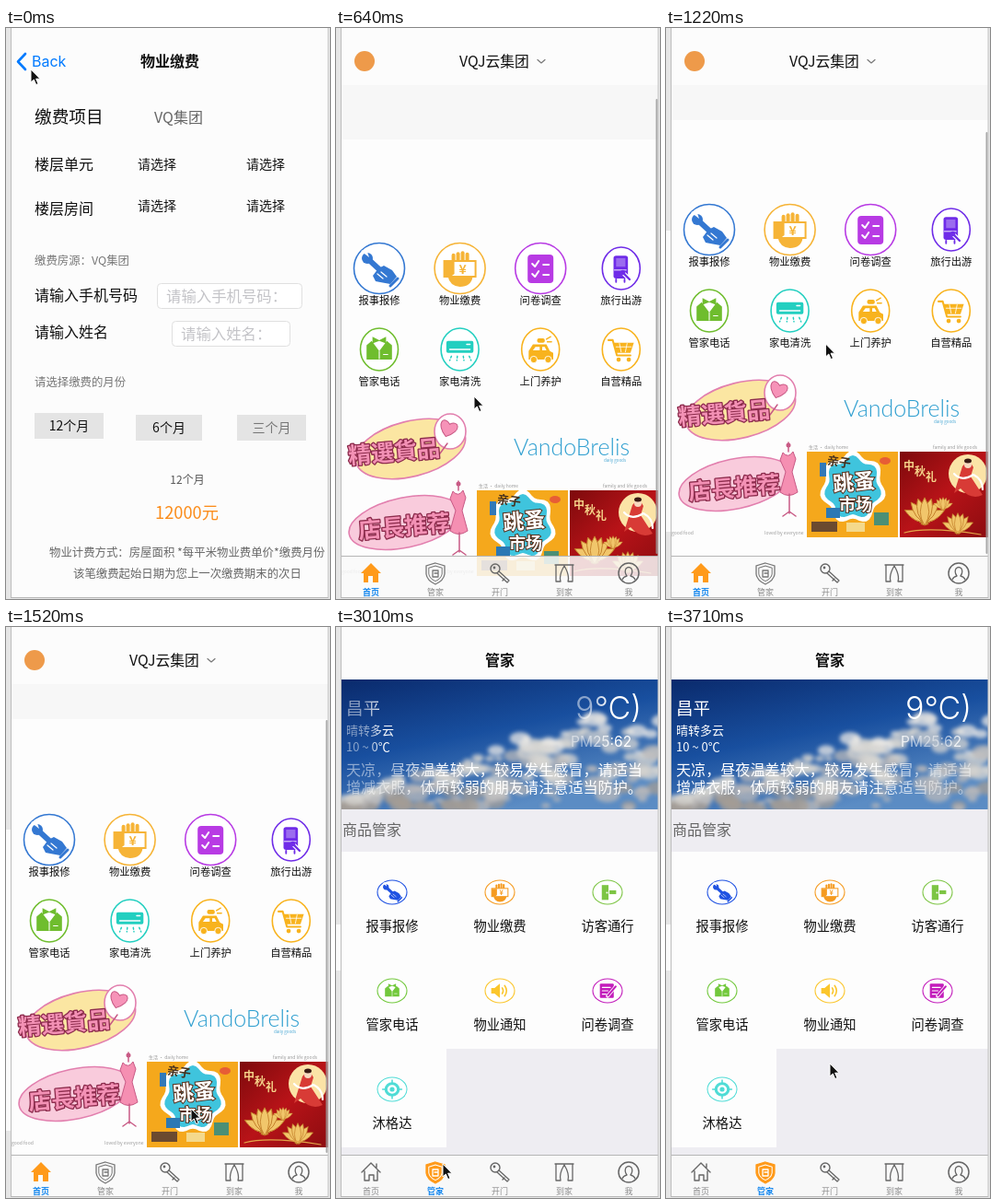
An HTML page that plays this animation: 352x620 px, repeating every 3.86 s.

```html
<!DOCTYPE html>
<html lang="zh">
<head>
<meta charset="utf-8">
<style>
html, body { margin: 0; width: 100%; height: 100%; overflow: hidden; background: #e6e6e6; }
svg { display: block; }
text { font-family: "Noto Sans CJK SC", "Noto Sans CJK", "Noto Sans CJK JP", sans-serif; white-space: pre; }
.latin { font-family: Inter, "Liberation Sans", sans-serif; }
</style>
</head>
<body>
<svg id="stage" width="352" height="620" viewBox="0 0 352 620"></svg>
<script>
const LOOP = 3860;

// ---- markup helpers ----
const attrs = o => Object.entries(o).map(([k, v]) => ` ${k}="${v}"`).join('');
const rect = (x, y, w, h, fill, o = {}) =>
  `<rect x="${x}" y="${y}" width="${w}" height="${h}" fill="${fill}"${attrs(o)}/>`;
const oval = (x, y, rx, ry, fill, o = {}) =>
  `<ellipse cx="${x}" cy="${y}" rx="${rx}" ry="${ry}" fill="${fill}"${attrs(o)}/>`;
const dot = (x, y, r, fill, o) => oval(x, y, r, r, fill, o);
const shape = (d, fill, o = {}) => `<path d="${d}" fill="${fill}"${attrs(o)}/>`;
const line = (d, color, width = 1.5, o = {}) => shape(d, 'none',
  { stroke: color, 'stroke-width': width, 'stroke-linecap': 'round', 'stroke-linejoin': 'round', ...o });
const text = (s, x, cy, size, fill = '#111', o = {}) =>
  `<text x="${x}" y="${cy + size * 0.37}" font-size="${size}" fill="${fill}"${attrs(o)}>${s}</text>`;
const mid = (s, x, cy, size, fill, o = {}) => text(s, x, cy, size, fill, { 'text-anchor': 'middle', ...o });
const at = (x, y, body, scale = 1, turn = 0) =>
  `<g transform="translate(${x} ${y}) rotate(${turn}) scale(${scale})">${body}</g>`;
const group = (id, body) => `<g id="${id}">${body}</g>`;
const bold = { 'font-weight': 700 };

function random(seed) {
  return () => (seed = (seed * 16807) % 2147483647) / 2147483647;
}

function blob(x, y, r, fill) {
  const points = Array.from({ length: 60 }, (_, i) => {
    const a = i * Math.PI / 30, d = r * (1 + .09 * Math.sin(a * 7));
    return `${(x + d * .9 * Math.cos(a)).toFixed(1)} ${(y + d * Math.sin(a)).toFixed(1)}`;
  });
  return shape(`M${points.join('L')}Z`, fill);
}

// ---- service icons, drawn around 0,0 ----
const icon = {};
icon.repair = c => line('M-12 -10L1 2', c, 6) + dot(-13, -11, 6, c) + shape('M-20 -19L-11 -12L-14 -21Z', '#fff') +
  shape('M-7 8L-1 0L5 -3L14 2L19 9L12 17L1 15L-4 14Z', c) + line('M-2 6L4 11M2 4L8 9', '#fff', 1.2) + line('M12 19L20 11', c, 3);
icon.pay = c => shape('M-13 9H14Q12 20 0 20Q-11 19 -13 9Z', c) +
  [-9, -4, 1, 6].map(x => rect(x, -19 + Math.abs(x) * .3, 4, 15, c, { rx: 2 })).join('') +
  rect(-17, -8, 34, 17, '#fff', { stroke: c, 'stroke-width': 2 }) +
  shape('M-17 -7H-6V6L-10 9H-17Z', c) + mid('¥', 3, .5, 14, c, bold);
icon.survey = c => rect(-14, -15, 28, 31, c, { rx: 4 }) +
  [-5, 6].map(y => line(`M-9 ${y}l3 3l4 -6M3 ${y + 1}h6`, '#fff', 2)).join('');
icon.travel = c => rect(-9, -15, 17, 27, c, { rx: 3 }) + rect(-6, -12, 11, 10, '#fff', { opacity: .3 }) +
  line('M-8 2H6', '#fff', 1) + line('M-6 13v3M4 13v3', c, 2) +
  line('M2 5l8 8', '#fff', 5) + line('M2 5l8 8', c, 2.5) + dot(2, 5, 3, c);
icon.butler = c => shape('M-15 -5L-9 -10L0 2L9 -10L15 -5V12H-15Z', c) +
  shape('M-8 -15L0 -11L8 -15V-7L0 -10L-8 -7Z', c) + line('M0 2V11M5 6H10', '#fff', 1.2);
icon.air = c => rect(-16, -10, 32, 14, c, { rx: 2 }) + line('M-12 0H12M8 -6H12', '#fff') +
  [-10, -3, 4, 11].map(x => line(`M${x} 8l${x / 5} 5`, c, 1.6, { 'stroke-dasharray': '2 2.5' })).join('');
icon.wash = c => shape('M-14 12V2L-9 -6H7L11 2L15 4V12Z', c) + shape('M-9 1l3 -4h5v4ZM2 1v-4h3l2 4Z', '#fff') +
  [-8, 9].map(x => dot(x, 12, 4, c, { stroke: '#fff' })).join('') +
  rect(-4, -13, 9, 5, c, { rx: 2 }) + line('M7 -12L12 -15M8 -9H13', c);
icon.cart = c => line('M-15 -11H-10L-5 7H11', c, 2.2) + shape('M-9 -8H15L11 4H-6Z', c) +
  line('M-6 -3H12M-2 -7L0 3M7 -7L5 3', '#fff', .9) + dot(-3, 12, 2.6, c) + dot(9, 12, 2.6, c);
icon.door = c => rect(-12, -15, 14, 31, c) + rect(4, -4, 14, 8, c) + dot(-1, 1, 2, '#fff');
icon.speaker = c => shape('M-18 -6H-11L0 -15V15L-11 6H-18Z', c) + line('M5 -6Q9 0 5 6M10 -11Q18 0 10 11', c, 3);
icon.note = c => rect(-16, -15, 29, 30, c, { rx: 2 }) + line('M-11 -7H6M-11 0H1M-11 7H-3', '#fff', 2) +
  line('M0 11L17 -9', '#fff', 7) + line('M1 10L17 -9', c, 4);
icon.target = c => oval(0, 0, 13, 12, 'none', { stroke: c, 'stroke-width': 6 }) + dot(0, 0, 5, c) +
  line('M0 -19v7M0 19v-7M-20 0h7M20 0h-7', c, 3);

// ---- bottom tabs ----
const homeTab = on => on
  ? shape('M0 -11L11 0H8V10H2V3H-3V10H-8V0H-11Z', '#ff9a1a')
  : line('M-10 0L0 -10L10 0M-7 -1V9H-2V3H3V9H7V-1M6 -9V-5', '#666', 1.4);
const butlerTab = on => {
  const edge = on ? '#ff9a1a' : '#777', ink = on ? '#fff' : '#777', shield = 'M0 -11L10 -8V1Q9 8 0 12Q-9 8 -10 1V-8Z';
  return shape(shield, on ? edge : '#fafafa', { stroke: edge, 'stroke-width': 1.3 }) +
    at(0, 0, line(shield, ink, 1.4), .72) + line('M-3 -3H3V4H-3ZM-1 0H3', ink, 1.3);
};
const doorTab = () => dot(-5, -5, 5, 'none', { stroke: '#666', 'stroke-width': 1.4 }) + dot(-6, -6, 1.4, '#666') +
  line('M-1 -2L10 8L8 10L-3 0M5 6L3 8', '#666', 1.3);
const visitTab = () => line('M-10 -9H10M-9 -9V9H-4Q-6 2 0 -8Q6 2 4 9H9V-9', '#666', 1.3);
const meTab = () => dot(0, 0, 11, 'none', { stroke: '#666', 'stroke-width': 1.5 }) +
  line('M-7 7Q-6 4 -2 3Q-5 -1 -3 -5Q0 -8 3 -5Q5 -1 2 3Q6 4 7 7', '#666', 1.3);
const tabs = [['首页', homeTab], ['管家', butlerTab], ['开门', doorTab], ['到家', visitTab], ['我', meTab]];
const tabBar = active => rect(5, 573, 345, 46, '#fafafa', { 'fill-opacity': .86 }) + rect(5, 573, 345, 1, '#b5b5b5') +
  tabs.map(([name, mark], i) => {
    const x = 38 + i * 70, on = i === active;
    return at(x, 592, mark(on)) + mid(name, x, 613, 9, on ? '#1487ee' : '#8a8a8a', on ? bold : {});
  }).join('');

// ---- home page ----
const services = [
  ['repair', '报事报修', '#3478d2'], ['pay', '物业缴费', '#f6b437'], ['survey', '问卷调查', '#b83be4'], ['travel', '旅行出游', '#6f2ce8'],
  ['butler', '管家电话', '#6fbd2e'], ['air', '家电清洗', '#23cfc0'], ['wash', '上门养护', '#f8b31e'], ['cart', '自营精品', '#f8b31e']
];
const serviceGrid = services.map(([kind, name, color], i) => {
  const x = 47 + (i % 4) * 87.6, y = i < 4 ? 231 : 319, big = i < 3;
  return oval(x, y, big ? 27.5 : 20.5, big ? 27.5 : 23, '#fff', { stroke: color, 'stroke-width': 1.6 }) +
    at(x, y, icon[kind](color), big ? 1 : .92) + mid(name, x, y + 34.5, 11.3);
}).join('');

const sticker = (s, x, y) => at(x, y, mid(s, 0, 0, 25, '#f391b5', {
  'font-weight': 900, stroke: '#8c2b4c', 'stroke-width': 2.6, 'paint-order': 'stroke', 'stroke-linejoin': 'round'
}), 1, -5);
const pink = '#c85a85';
const outline = { stroke: '#e27fae', 'stroke-width': 1.6 };
const goodsSticker = at(81, 427, oval(0, 0, 61, 30, '#fbe6a2', outline), 1, -14) + oval(124, 408, 17, 19, '#fff', outline) +
  at(122, 405, shape('M0 9C-16 -2 -8 -13 0 -5C8 -13 16 -2 0 9Z', '#f693b8', { stroke: pink }), 1, 18) +
  line('M113 432L121 421', pink) + sticker('精選貨品', 63, 430);
const shopSticker = at(75, 507, oval(0, 0, 62, 27, '#f9cbdc', outline), 1, -12) +
  at(133, 495, shape('M-6 -22Q0 -15 5 -23L8 -15L4 -1L10 21Q0 28 -9 21L-3 -1L-9 -14Z', '#f58fb2', { stroke: pink }) +
    line('M0 -33v10M1 23v21M-6 47l7 -5l7 5', pink) + dot(0, -30, 2.5, pink)) +
  sticker('店長推荐', 74, 511);

const ink = { 'font-weight': 900, stroke: '#57301c', 'stroke-width': 2, 'paint-order': 'stroke' };
const fleaPoster = rect(153, 472, 99, 93, '#f5a81c') + blob(203, 511, 37, '#fff') + blob(203, 511, 32, '#3fc4dd') +
  at(188, 483, mid('亲子', 0, 0, 13, '#46301d', { 'font-weight': 900 }), 1, 8) +
  at(204, 505, mid('跳蚤', 0, 0, 23, '#fff', ink), 1, -6) + mid('市场', 206, 529, 18, '#fff', ink) +
  rect(167, 484, 7, 15, '#3279b8') + rect(174, 533, 15, 11, '#2b78b4') + rect(158, 548, 28, 11, '#6b4a2f') +
  oval(238, 482, 6, 4, '#e75d35') + rect(226, 538, 16, 14, '#4b8f75') + rect(196, 549, 20, 10, '#f4d98c');

const lotus = (x, y, s) => at(x, y, [-64, 64, -38, 38, -18, 18, 0].map(a =>
  at(0, 0, shape('M0 6Q-9 -8 0 -23Q9 -8 0 6Z', '#f1c66b', { stroke: '#c07c27', 'stroke-width': .8 }), 1, a)).join(''), s);
const moonPoster = rect(254, 472, 96, 93, 'url(#red)') + dot(328, 496, 21, '#fbe3a6') +
  shape('M322 488Q329 479 334 489L331 499L344 519Q331 525 320 512L313 517Z', '#d83b36') +
  dot(328, 486, 4, '#f7d9c0') + oval(328, 482, 4, 2.5, '#3a1a14') + line('M313 496Q321 505 334 497Q344 502 344 513', '#fff', 2.2) +
  ['中', '秋', '礼'].map((c, i) => mid(c, 264 + i * 12, 488 + i * 6, 12, '#f6d48a', bold)).join('') +
  lotus(281, 546, 1.05) + lotus(317, 557, .8) + lotus(301, 533, .5) + line('M259 560Q285 553 342 562', '#e3a548', 1.2);

const tiny = (s, x, y) => text(s, x, y, 5, '#999');
const homeContent = serviceGrid + goodsSticker + shopSticker +
  text('VandoBrelis', 193, 425, 25, '#2f9fd0', { style: 'font-family:Lato,sans-serif;font-weight:300' }) +
  text('daily goods', 291, 439, 4.5, '#4aa8d4') +
  tiny('生活 · daily home', 155, 467) + tiny('family and life goods', 290, 467) +
  tiny('good food', 6, 560) + tiny('loved by everyone', 107, 560) + fleaPoster + moonPoster;

const homeNav = dot(31, 36, 11, '#ee9a4a') + text('VQJ云集团', 134, 36, 15.8) + line('M219 34.5l4 3.5l4 -3.5', '#777', 1.2);

// ---- payment page ----
const grey = '#777';
const field = (x, y, w, s) => rect(x + .5, y + .5, w, 27, '#fff', { rx: 4, stroke: '#e0e0e0' }) + text(s, x + 10, y + 14, 16.4, '#c4c4c8');
const monthButton = (x, y, w, s, color) => rect(x, y, w, 28, '#e4e4e4') + mid(s, x + w / 2, y + 14, 14, color);
const chooser = (label, y, pickY) => text(label, 31, y, 16) + [143, 261].map(x => text('请选择', x, pickY, 14)).join('');
const payTop = text('缴费项目', 31, 96, 18.7) + text('VQ集团', 161, 97, 16, '#666') +
  chooser('楼层单元', 148, 148) + chooser('楼层房间', 196, 193) + text('缴费房源：VQ集团', 31, 252, 12.4, grey) +
  text('请输入手机号码', 31, 290, 16) + field(164, 277, 157, '请输入手机号码：') +
  text('请输入姓名', 31, 330, 16) + field(180, 318, 128, '请输入姓名：');
const payBottom = text('请选择缴费的月份', 31, 384, 12.4, grey) +
  monthButton(31, 418, 75, '12个月', '#111') + monthButton(141, 420, 72, '6个月', '#111') + monthButton(251, 420, 75, '三个月', grey) +
  mid('12个月', 197, 491, 12, '#555') + mid('12000元', 196.5, 526, 18.3, '#fb8c1a') +
  text('物业计费方式：房屋面积 *每平米物业费单价*缴费月份', 47, 569, 12.4, '#666') +
  text('该笔缴费起始日期为您上一次缴费期末的次日', 73, 592, 12.4, '#666');
const payContent = rect(5, 62, 345, 557, '#fcfcfc') + payTop + payBottom;

// ---- butler page ----
function clouds() {
  const next = random(29);
  const tints = ['#eceae6', '#d7d5d2', '#b9b8ba', '#a39c95'];
  let out = '';
  for (let i = 0; i < 170; i++) {
    const x = next() * 349;
    const top = 186 - 86 * Math.min(1, x / 255) + 6 * Math.sin(x / 16);
    const depth = next(), r = 4 + next() * 10;
    const tint = tints[Math.min(3, Math.floor(depth * 2.4 + next() * 1.5 + (x < 150 ? .7 : 0)))];
    out += oval(Math.round(x + 5), Math.round(top + depth * (197 - top)), r.toFixed(1), (r * .62).toFixed(1), tint, { opacity: .75 });
  }
  return out;
}
const hero = `<g clip-path="url(#heroBox)">${rect(5, 57, 345, 141, 'url(#sky)')}<g filter="url(#soft)">${clouds()}</g></g>` +
  text('昌平', 11, 88, 18.5, 'url(#city)') + text('晴转多云', 11, 112, 13, 'url(#city)') + text('10 ~ 0℃', 11, 130, 13, 'url(#city)') +
  text('9°C)', 260, 87, 34, 'url(#temp)', { class: 'latin', 'font-weight': 300 }) +
  text('PM25:62', 255, 124, 15.5, 'url(#air)', { class: 'latin' }) +
  text('天凉，昼夜温差较大，较易发生感冒，请适当', 11, 155, 16.1, 'url(#tip)') +
  text('增减衣服，体质较弱的朋友请注意适当防护。', 11, 174, 16.1, 'url(#tip)');

const duties = [
  ['repair', '报事报修', '#1f52e2'], ['pay', '物业缴费', '#f59b20'], ['door', '访客通行', '#7dc544'],
  ['butler', '管家电话', '#72c83c'], ['speaker', '物业通知', '#fbc62c'], ['note', '问卷调查', '#c31cbb'],
  ['target', '沐格达', '#4fdcd6']
];
const dutyGrid = rect(5, 244, 345, 214, '#fdfdfd') + rect(5, 458, 115, 107, '#fdfdfd') +
  duties.map(([kind, name, color], i) => {
    const x = 61 + (i % 3) * 117, y = 288 + Math.floor(i / 3) * 107;
    return oval(x, y, 16, 13, '#fff', { stroke: color, 'stroke-width': 1.1 }) +
      at(x, y, icon[kind](color), .52) + mid(name, x, y + 36.5, 14.3);
  }).join('');
const butlerPage = rect(5, 0, 345, 619, '#fcfcfc') + mid('管家', 178, 36, 16, '#111', bold) +
  rect(5, 57, 345, 562, '#eeedf2') + hero + text('商品管家', 7, 220, 16, '#666') + dutyGrid + tabBar(1);

// ---- stage ----
const stops = (...list) => list.map(([o, c, a = 1]) => `<stop offset="${o}" stop-color="${c}" stop-opacity="${a}"/>`).join('');
const shimmer = id => `<linearGradient id="${id}" gradientUnits="userSpaceOnUse" y1="0" y2="0">` +
  stops([0, '#fff'], [.35, '#fff', .5], [.65, '#fff', .5], [1, '#fff']) + '</linearGradient>';
const clip = (id, y, h) => `<clipPath id="${id}">${rect(5, y, 345, h, '#000')}</clipPath>`;
const defs = `<defs>
  <linearGradient id="red" x2="1" y2="1">${stops([0, '#7d0a0c'], [.5, '#b81318'], [1, '#8c0c10'])}</linearGradient>
  <linearGradient id="sky" x2=".5" y2="1">${stops([0, '#0a2a6c'], [.5, '#184f9f'], [1, '#5b8cc4'])}</linearGradient>
  ${['city', 'temp', 'air', 'tip'].map(shimmer).join('')}
  <filter id="soft"><feGaussianBlur stdDeviation="2.2"/></filter>
  ${clip('heroBox', 57, 141)}${clip('body', 62, 557)}${clip('phone', 0, 619)}</defs>`;

const homeBody = rect(5, 62, 345, 557, '#fdfdfd') + group('veil', rect(5, 62, 345, 1, '#f7f7f7')) + group('scroll', homeContent);
const backLink = line('M21 28L13 36.5L21 45', '#007aff', 2.6) + text('Back', 28, 36.5, 16, '#007aff', { class: 'latin' });
const phone = rect(5, 0, 345, 619, '#fcfcfc') + group('home', `<g clip-path="url(#body)">${homeBody}</g>` + tabBar(0)) +
  group('thumb', rect(347.5, 0, 2, 1, '#9a9a9a', { rx: 1 })) + group('homeNav', homeNav) +
  group('pay', payContent) + group('back', backLink) + group('payTitle', mid('物业缴费', 178, 36, 16, '#111', bold)) +
  group('butler', butlerPage);
const frame = rect(5, 0, 1, 619, '#bdbdbd') + rect(349.5, 0, 1, 619, '#c4c4c4') + rect(5, 618, 345, 1, '#b8b8b8');
const arrow = shape('M0 0V14L3.3 11L5.7 16.6L8 15.6L5.6 10.2H10Z', '#111', { stroke: '#fff' });

document.getElementById('stage').innerHTML = defs + rect(0, 0, 352, 620, '#e6e6e6') + group('band', rect(0, 0, 5, 1, '#fbfbfb')) +
  `<g clip-path="url(#phone)">${phone}</g>` + frame + group('cursor', arrow);

// ---- motion: the picture changes only at these times ----
const beats = [0, 50, 170, 350, 470, 640, 750, 930, 1040, 1220, 1340, 1520, 1640, 1760, 1940, 2050, 2230, 2350,
  2650, 2830, 3010, 3180, 3300, 3420, 3590, 3710];
const cursorPath = [[0, 27, 45], [50, 28, 46], [350, 117, 257], [470, 138, 380], [640, 150, 400], [930, 154, 224],
  [1040, 157, 235], [1520, 201, 523], [1760, 196, 564], [2050, 120, 592], [2350, 112, 590], [2830, 111, 589],
  [3010, 116, 583], [3420, 164, 511], [3590, 177, 477], [3710, 178, 474]];
const scrollPath = [[470, 46], [640, 30], [750, -15], [930, -82], [1040, -50], [1220, -12], [1340, -2], [1520, 0]];
const slidePath = [[0, 0, 0], [50, 30, 0], [170, 215, .12], [350, 331, .5], [470, 345, 1]];

function sample(path, t) {
  const i = path.findIndex(p => p[0] >= t);
  if (i < 0) return path[path.length - 1].slice(1);
  if (i === 0) return path[0].slice(1);
  const a = path[i - 1], b = path[i], f = (t - a[0]) / (b[0] - a[0]);
  return a.slice(1).map((v, k) => v + (b[k + 1] - v) * f);
}

const el = id => document.getElementById(id);
const move = (id, x, y = 0) => el(id).setAttribute('transform', `translate(${x} ${y})`);
const fade = (id, a) => el(id).setAttribute('opacity', Math.max(0, a));
const span = (id, y, h) => {
  const r = el(id).firstChild;
  r.setAttribute('y', y);
  r.setAttribute('height', Math.max(0, h));
};
const sweep = (id, x, w, centre, half) => {
  el(id).setAttribute('x1', x + w * (centre - half));
  el(id).setAttribute('x2', x + w * (centre + half));
};

function draw(t) {
  const [shift] = sample(scrollPath, t), [slide, bar] = sample(slidePath, t);
  move('cursor', ...sample(cursorPath, t));
  move('home', (slide - 345) * .36);
  move('homeNav', (slide - 345) * .36);
  fade('homeNav', bar);
  move('scroll', 0, shift);
  span('veil', 62, t < 470 ? 0 : t < 1220 ? 59 : 38);

  const top = 101 + Math.max(0, -shift) - Math.max(0, shift) * .8;
  span('thumb', top, 571 - top);
  fade('thumb', t < 640 || t >= 2050 ? 0 : t >= 1940 ? .4 : .85);

  move('pay', slide);
  move('payTitle', slide * .5);
  fade('payTitle', 1 - slide / 300);
  fade('back', 1 - slide / 250);

  el('butler').style.display = t >= 2650 ? '' : 'none';
  if (t < 750) span('band', 0, 0);
  else if (t < 2830) span('band', 220, 327);
  else span('band', 323, 50);

  const s = (t - 3010) / 1000;
  sweep('city', 11, 52, .2 + s * 2.5, .6);
  sweep('temp', 261, 64, .05 + s * 2.5, .5);
  sweep('air', 255, 65, .15 + s * .5, .6);
  sweep('tip', 11, 322, .03 + s * 1.34, .32);
}

let shown = -1;
function tick(now) {
  const t = now % LOOP;
  const beat = beats.filter(b => b <= t).pop();
  if (beat !== shown) draw(shown = beat);
  requestAnimationFrame(tick);
}
draw(shown = 0);
requestAnimationFrame(tick);
</script>
</body>
</html>
```
